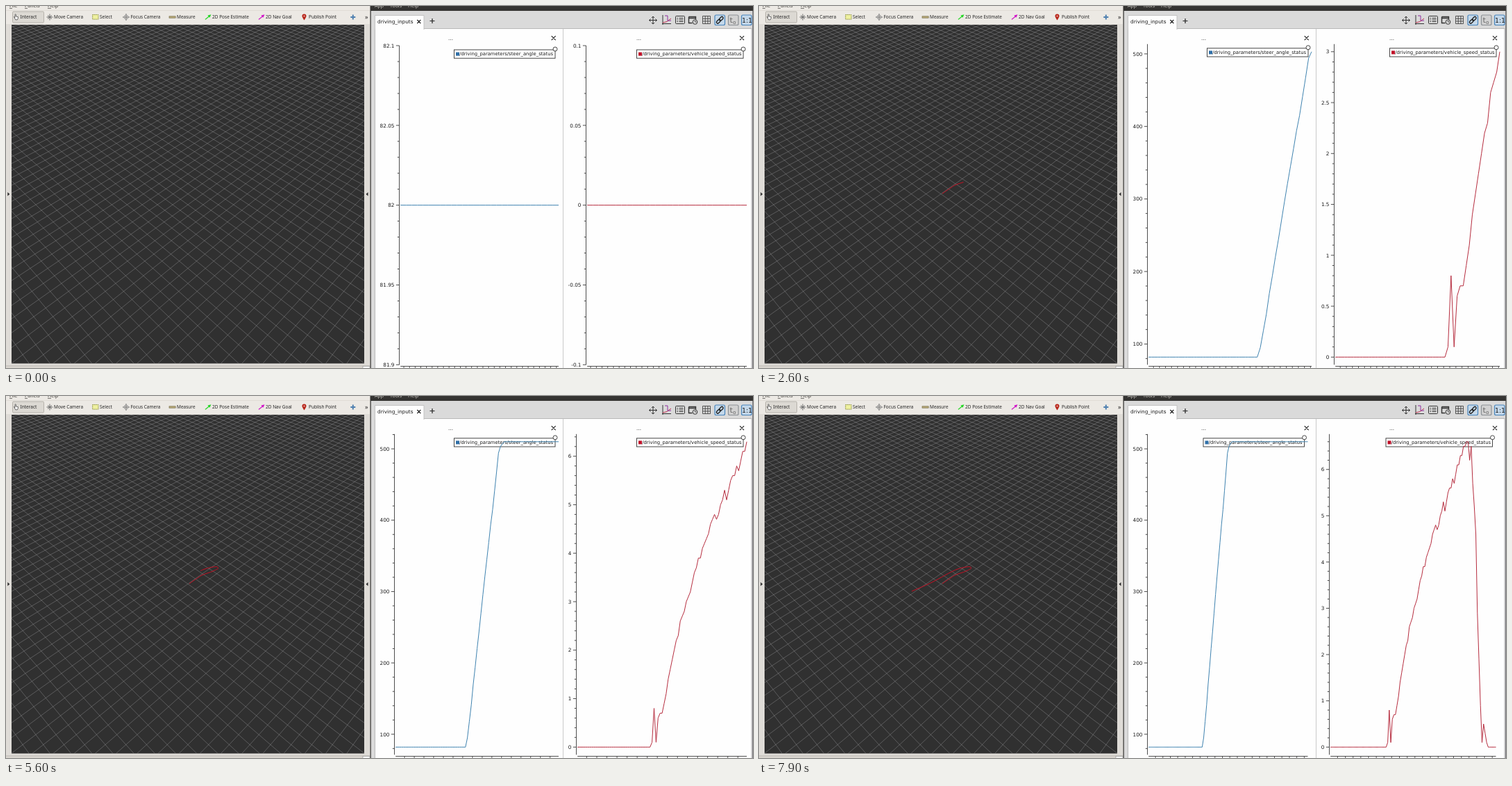
Animation, 1076 px wide and 521 px high, one loop 8 s. Source, as an HTML page:

```html
<!DOCTYPE html>
<html lang="en">
<head>
<meta charset="utf-8">
<title>Driving inputs</title>
<style>
html, body { margin: 0; width: 100%; height: 100%; overflow: hidden; background: #fff; }
svg { display: block; }
text { white-space: pre; }
.tools { font: 6.5px "Noto Sans", "Open Sans", sans-serif; fill: #262626; }
.menu { font: 7px "Noto Sans", "Open Sans", sans-serif; }
.ui { font: 7.3px "DejaVu Sans", sans-serif; fill: #1c1c1c; }
.legend { font: 6.8px "DejaVu Sans", sans-serif; fill: #1c1c1c; }
.axis { fill: none; stroke: #3a3a3a; stroke-width: .9; }
</style>
</head>
<body>
<svg id="stage" width="1076" height="521" viewBox="0 0 1076 521">
  <!-- 3D view window -->
  <rect width="525" height="521" fill="#dfdcd7"/>
  <rect width="524" height="26" fill="#ece9e4"/>
  <g class="menu" fill="#3c3a36">
    <text x="5" y="2">File</text><text x="27" y="2">Panels</text><text x="60" y="2">Help</text>
    <path d="M5 3.4h4M27 3.4h4M60 3.4h5" stroke="#3c3a36" stroke-width=".7"/>
  </g>
  <path d="M0 6.5H524" stroke="#e0dcd6"/>
  <rect x="9.5" y="8" width="45" height="16" rx="1.5" fill="#dcd9d3" stroke="#aaa69f" stroke-width=".8"/>
  <g class="tools">
    <text x="20.5" y="18.4">Interact</text>
    <text x="69" y="18.4">Move Camera</text>
    <text x="135" y="18.4">Select</text>
    <text x="179.5" y="18.4">Focus Camera</text>
    <text x="246" y="18.4">Measure</text>
    <text x="297" y="18.4">2D Pose Estimate</text>
    <text x="374" y="18.4">2D Nav Goal</text>
    <text x="436" y="18.4">Publish Point</text>
    <text x="517" y="18.6" style="font-size:9px">»</text>
  </g>
  <path d="M11.5 15.5l1.5 1V12.2q.8-1 1.3 0V15l3 .6v2.2l-1 2h-2.6z" fill="#fff" stroke="#333" stroke-width=".7"/>
  <g stroke="#6b6b6b" fill="none">
    <path d="M58.5 16h9M63 11.5v9M60 13.5l6 5M66 13.5l-6 5"/>
    <path d="M168 16h10M173 11v10"/><circle cx="173" cy="16" r="3" stroke="#999"/>
  </g>
  <rect x="124.7" y="12.5" width="8.3" height="6.6" fill="#eef0a0" stroke="#8f9440" stroke-dasharray="1.6 .8"/>
  <rect x="235" y="14.8" width="9.2" height="2.4" fill="#b7a976" stroke="#6d6548" stroke-width=".6"/>
  <path d="M286.5 19l5-4-1-1.5 5-1.3-2 4.6-1-1-5 4z" fill="#25d625"/>
  <path d="M363.5 19l5-4-1-1.5 5-1.3-2 4.6-1-1-5 4z" fill="#d012c8"/>
  <path d="M429.5 20.5q-3-4.5-3-6a3 3 0 0 1 6 0q0 1.5-3 6z" fill="#b8261c"/>
  <circle cx="429.5" cy="14.4" r="1" fill="#f0d0c8"/>
  <path d="M499.8 12.5v7M496.3 16h7" stroke="#4f80b0" stroke-width="2"/>
  <rect x="8" y="27" width="508" height="487.5" fill="#303030"/>
  <svg x="8" y="27" width="508" height="487.5" viewBox="8 27 508 487.5">
    <path id="grid" fill="none" stroke="#a0a0a4" stroke-opacity=".55" stroke-width=".7"/>
    <path id="track" fill="none" stroke="#c81024" stroke-width="1" stroke-linejoin="round"/>
  </svg>
  <path d="M2.3 268v5.5l3-2.75zM521.5 268v5.5l-3-2.75z" fill="#2c2c2c"/>
  <path d="M0 518H524" stroke="#b9b5ae"/>
  <rect y="519.5" width="514" height="2" fill="#d8d4cd"/>
  <rect x="514" y="518.5" width="10" height="4" fill="#fafafa" stroke="#999" stroke-width=".7"/>

  <!-- plot window -->
  <rect x="525" width="551" height="521" fill="#dadada"/>
  <path d="M525.2 0V521" stroke="#5c5b59" stroke-width="1.6"/>
  <path d="M1075.5 0V521" stroke="#77767a"/>
  <rect x="525" width="551" height="7" fill="#353432"/>
  <g class="menu" fill="#c9c6c0">
    <text x="531" y="2">App</text><text x="553" y="2">Tools</text><text x="579" y="2">Help</text>
  </g>
  <rect x="531.5" y="32.5" width="542.5" height="490" fill="#fefefe" stroke="#b9b9b9"/>
  <path d="M531.5 34V13.5H602V34" fill="#fefefe" stroke="#b9b9b9" stroke-width=".8"/>
  <path d="M802.5 33V521" stroke="#c9c9c9"/>
  <g class="ui">
    <text x="535" y="25">driving_inputs</text>
    <text x="637" y="49">...</text><text x="908" y="49">...</text>
  </g>
  <g stroke="#222" stroke-width="1.2">
    <path d="M592.3 20l5 5m0-5l-5 5M614 18v7M610.5 21.5h7"/>
    <path d="M785.7 43.2l6 6m0-6l-6 6M1057 43.2l6 6m0-6l-6 6"/>
  </g>
  <g fill="none" stroke="#333">
    <path d="M926.5 20.5h11M932 15v11M928.5 18.5l-2 2 2 2M935.5 18.5l2 2-2 2M930 17l2-2 2 2M930 24l2 2 2-2"/>
    <path d="M946 13v14M945 25.5h13"/>
    <path d="M946 24q6 0 12-6" stroke="#c03050"/><path d="M949 14h4v7h5" stroke="#9030a0"/>
    <rect x="964.5" y="14.5" width="13" height="11" rx="1"/>
    <path d="M966.5 17.5h1.5m1.5 0h6M966.5 20h1.5m1.5 0h6M966.5 22.5h1.5m1.5 0h6"/>
    <path d="M983.5 15.5h10v4M983.5 15.5v9h5M983.5 17.5h10" stroke-width="1.4"/>
    <circle cx="992.5" cy="23" r="3.3"/><path d="M992.5 21v2h2" stroke-width=".8"/>
    <path d="M1003.5 14.5h11v11h-11zM1003.5 18.2h11M1003.5 21.9h11M1007.2 14.5v11M1010.9 14.5v11" stroke-width=".8"/>
  </g>
  <g stroke-width="1.2">
    <rect x="1021" y="13" width="14.5" height="14.5" rx="2" fill="#c4d8ea" stroke="#4a86bd"/>
    <rect x="1040.5" y="13" width="14.5" height="14.5" rx="2" fill="#d2d2d2" stroke="#8d9297"/>
    <rect x="1059.5" y="13" width="14.5" height="14.5" rx="2" fill="#c4d8ea" stroke="#4a86bd"/>
  </g>
  <g fill="none" stroke="#222" stroke-width="1.4">
    <rect x="1023" y="20.5" width="6.5" height="3.6" rx="1.8" transform="rotate(-45 1026.2 22.3)"/>
    <rect x="1027" y="16.5" width="6.5" height="3.6" rx="1.8" transform="rotate(-45 1030.2 18.3)"/>
  </g>
  <g class="ui">
    <text x="1042.5" y="23.5" style="font-size:11px;fill:#666">t</text>
    <text x="1047" y="25.5" style="fill:#666">o</text>
    <text x="1060" y="23.7" style="font-size:9.3px">1:1</text>
  </g>
  <g id="plots"></g>
</svg>
<script>
const LOOP = 8000, STEP = 100;
const LEAD = 36;                        // idle samples before the first input
const HELD = [1, 5, 34, 36, 41, 77];    // steps on which the picture stalls
const $ = id => document.getElementById(id);

const steer = [82, 95, 118, 141, 170, 194, 220, 244, 270, 296, 321, 345, 369,
  394, 415, 441, 467, 494, 503, 507, 510];
const speed = [0, 1, 8, 1, 6, 7, 7, 9, 11, 14, 16, 18, 20, 22, 23, 26, 27, 28, 30,
  31, 32, 34, 36, 37, 39, 39, 41, 42, 43, 44, 46, 47, 48, 47, 48, 50, 51, 53, 51, 53, 55,
  56, 56, 58, 57, 59, 61, 61, 63, 63, 65, 65, 66, 66, 62, 65, 57,
  52, 46, 29, 19, 9, 1, 5, 3, 1, 0].map(v => v / 10);

const plots = [
  { data: steer, name: '/driving_parameters/steer_angle_status', base: 545.1, right: 796,
    legend: 145.5, line: '#3f83b0', mark: '#2f6fa8' },
  { data: speed, name: '/driving_parameters/vehicle_speed_status', base: 816.1, right: 1067,
    legend: 153.5, line: '#b62c3e', mark: '#c00f28' }
];

// step, x, y of the driven path
const route = [[7, 264, 270], [15, 275, 262.5], [20, 283, 257.5], [26, 294.5, 253.5],
  [33, 301.5, 250.5], [38, 305.5, 248.2], [42, 304, 245.8], [48, 297, 246.3],
  [54, 285, 249.5], [59, 272.5, 255.5], [64, 257, 264], [68, 242, 271.5], [76, 220, 281]];

// Ground grid seen by a camera pitched and turned by 45 degrees
function drawGrid() {
  const f = 588, dist = 38.96, h = Math.SQRT1_2, n = 80;
  const point = (a, b) => {
    const u = (a + b) * h, v = (a - b) * h, w = dist + u * h;
    return `${(262 + f * v / w).toFixed(2)} ${(270.5 - f * u * h / w).toFixed(2)}`;
  };
  let d = '';
  for (let a = -n; a <= n; a++) {
    const b = Math.max(-n, -51 - a);
    d += `M${point(a, b)}L${point(a, n)}M${point(b, a)}L${point(n, a)}`;
  }
  $('grid').setAttribute('d', d);
}

function spline(p0, p1, p2, p3, u) {
  return .5 * (2 * p1 + (p2 - p0) * u + (2 * p0 - 5 * p1 + 4 * p2 - p3) * u * u
    + (3 * p1 - p0 - 3 * p2 + p3) * u ** 3);
}

function routeAt(step) {
  const last = route.length - 1;
  let i = 0;
  while (i < last - 1 && route[i + 1][0] <= step) i++;
  const pts = [i - 1, i, i + 1, i + 2].map(k => route[Math.min(last, Math.max(0, k))]);
  const u = Math.min(1, (step - pts[1][0]) / (pts[2][0] - pts[1][0]));
  return [1, 2].map(c => spline(...pts.map(p => p[c]), u).toFixed(2)).join(' ');
}

function drawTrack(step) {
  const pts = [];
  for (let s = 7; s <= step; s++) pts.push(routeAt(s));
  $('track').setAttribute('d', pts.length > 1 ? 'M' + pts.join('L') : '');
}

function niceStep(x) {
  const p = 10 ** Math.floor(Math.log10(x));
  return [1, 2, 5, 10].find(m => x / p <= m + 1e-9) * p;
}

function scale(lo, hi) {
  const major = niceStep((hi - lo) / 8), minor = niceStep(major / 5);
  const n = Math.round(major / minor), ticks = [];
  for (let i = Math.ceil(lo / minor - 1e-6); i <= hi / minor + 1e-6; i++) {
    const rest = ((i % n) + n) % n;
    ticks.push({ v: i * minor, major: rest === 0, medium: rest * 2 === n });
  }
  return ticks;
}

const labelOf = v => String(+v.toFixed(4));
const labelWidth = s => 7.3 * [...s].reduce((w, c) => w + (c === '.' ? .318 : c === '-' ? .361 : .636), 0);

function plot(p, step) {
  const k = step - 8, count = LEAD + k;
  const value = i => p.data[Math.min(Math.max(0, i), p.data.length - 1)];
  const seen = [];
  for (let i = -LEAD; i <= k; i++) seen.push(value(i));
  const min = Math.min(...seen), max = Math.max(...seen), flat = min === max;
  const pad = flat ? .1 : (max - min) * .025;
  const lo = min - pad, hi = max + pad;
  const top = flat ? 57 : 54.8, bottom = 516.3;
  const y = v => bottom - (v - lo) / (hi - lo) * (bottom - top);

  const ticks = scale(lo, hi);
  const wide = Math.max(...ticks.filter(t => t.major).map(t => labelWidth(labelOf(t.v))));
  const axis = Math.round(p.base + wide) + .5;
  const left = axis + 1.7, right = p.right - (step >= 78 ? 5.5 : 0);
  const x = i => left + (right - left) * i / count;

  let d = `M${axis} ${top}V${bottom}M${left} 518.5H${right}`, labels = '';
  for (const t of ticks) {
    const ty = y(t.v);
    d += `M${axis} ${ty}h${t.major ? -4.6 : t.medium ? -3.6 : -2.7}`;
    if (t.major) labels += `<text x="${axis - 7}" y="${ty + 2.7}" text-anchor="end">${labelOf(t.v)}</text>`;
  }
  for (const t of scale(.04, .04 + count / 10)) d += `M${x((t.v - .04) * 10)} 518.5v3`;

  const curve = seen.map((v, i) => `${x(i).toFixed(2)},${y(v).toFixed(2)}`).join(' ');
  const end = right - 5, box = end - p.legend, by = top + 6;
  return `<path class="axis" d="${d}"/><g class="ui">${labels}</g>
    <rect x="${box}" y="${by}" width="${p.legend}" height="12.2" fill="#fff" stroke="#333" stroke-width=".9"/>
    <rect x="${box + 2.5}" y="${by + 3.6}" width="5" height="5" fill="${p.mark}"/>
    <text class="legend" x="${box + 7.7}" y="${by + 8.4}">${p.name}</text>
    <polyline points="${curve}" fill="none" stroke="${p.line}" stroke-width="1" stroke-linejoin="round"/>
    <circle cx="${end}" cy="${top + 5}" r="3" fill="#fff" stroke="#333" stroke-width=".9"/>`;
}

let shown = -1;
function tick() {
  let step = Math.floor(performance.now() % LOOP / STEP);
  if (HELD.includes(step)) step--;
  if (step !== shown) {
    shown = step;
    drawTrack(step);
    $('plots').innerHTML = plots.map(p => plot(p, step)).join('');
  }
  requestAnimationFrame(tick);
}

drawGrid();
tick();
</script>
</body>
</html>
```
